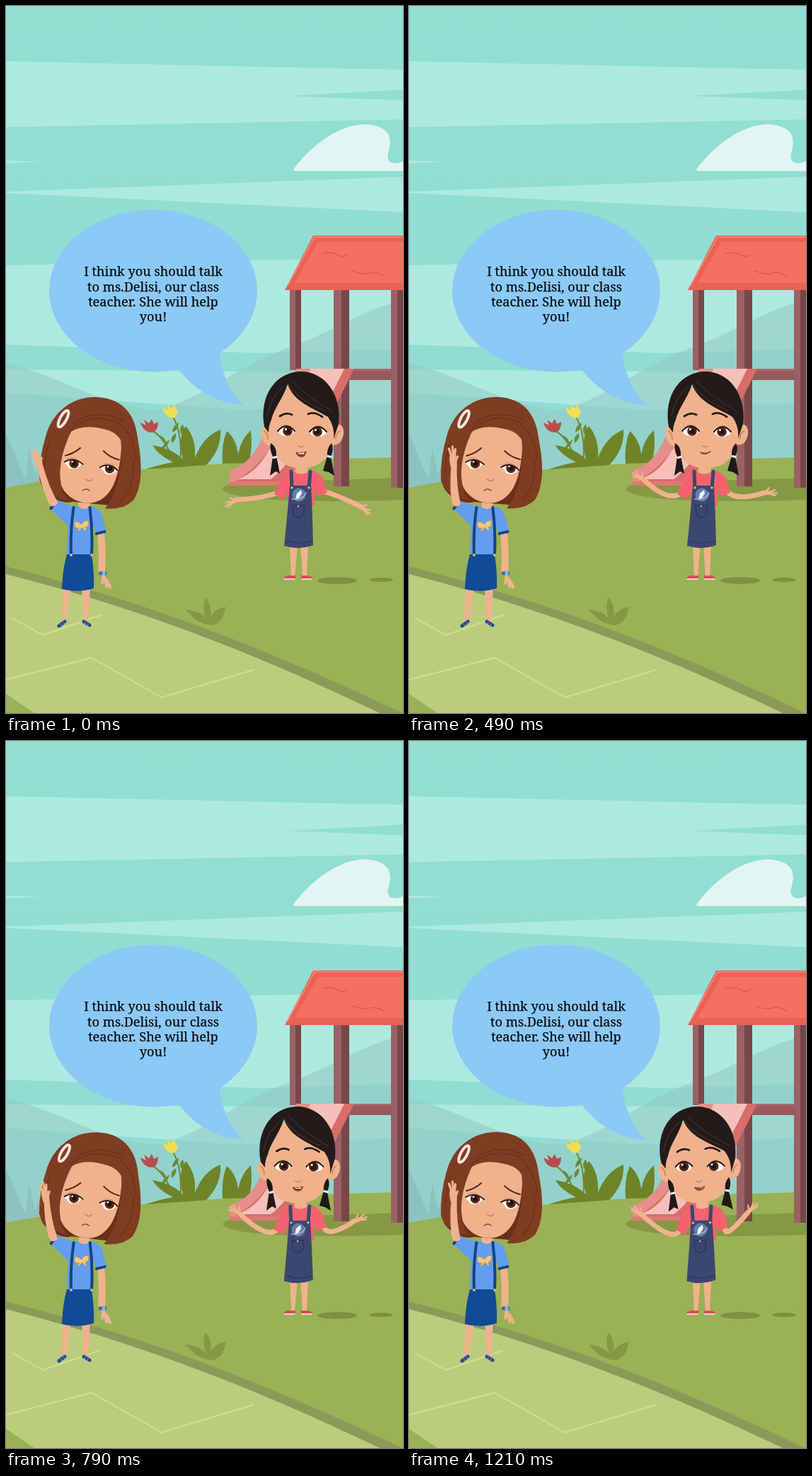
Animation of 561x998 px, one loop 1.28 s. Source, as an HTML page:

```html
<!DOCTYPE html>
<html lang="en">
<head>
<meta charset="utf-8">
<title>Playground talk</title>
<style>
html,body{margin:0;width:100%;height:100%;overflow:hidden;background:#93dfd2}
svg{position:fixed;inset:0;width:100%;height:100%;display:block}
.line{fill:none;stroke-linecap:round;stroke-linejoin:round}
.skin{fill:#f0b28d}
.limb{fill:none;stroke:#f0b28d;stroke-linecap:round;stroke-linejoin:round}
.fold{fill:none;stroke:#c8825f;stroke-width:1.5;stroke-linecap:round}
text{font:18.2px "Noto Serif",serif;text-anchor:middle;fill:#080c10;stroke:#080c10;stroke-width:.25}
</style>
</head>
<body>
<svg viewBox="0 0 561 998">
<defs>
  <linearGradient id="sky" x2="0" y2="1"><stop stop-color="#92dfd2"/><stop offset="1" stop-color="#90dcd4"/></linearGradient>
  <g id="hand">
    <ellipse class="skin" cx="5" rx="6" ry="3"/>
    <path class="limb" stroke-width="2.3" d="M7,0L18,0M7,-1L15,-4.5M7,1L16,3.5M2,-1L7,-7"/>
  </g>
</defs>

<g id="air">
  <path fill="url(#sky)" d="M0,0H561V700H0Z"/>
  <path fill="#aee9e0" d="M0,78L561,90V118L396,127L561,133V160L0,171ZM0,218L50,220L0,222ZM0,262L561,241V291L0,264ZM0,366L561,355V484L360,490L0,478ZM0,513L360,516L561,530V560L330,570L0,546Z"/>
  <path fill="#e3f5f3" d="M406,231C430,198 470,167 508,167C550,170 544,194 540,208C537,224 550,224 561,219V233H408Z"/>
  <path fill="#94cbc6" opacity=".6" d="M0,504C70,520 140,566 208,570C270,562 320,510 400,482C455,463 500,430 561,415V680H0Z"/>
  <path fill="#8cc3c2" d="M0,603L27,668L33,624L41,662L49,640L55,690H0Z"/>
</g>

<g id="ground">
  <path fill="#9ab155" d="M0,680C120,656 300,642 561,637V998H0Z"/>
  <path fill="#859944" d="M306,682C310,672 350,669 400,671L561,666V697C470,700 318,702 306,682Z"/>
  <path fill="#bacd7c" d="M0,797C190,848 350,908 545,998H0Z"/>
  <path fill="#8a9b59" d="M0,791C190,840 350,898 560,998H528C340,908 180,848 0,802Z"/>
  <path fill="#9ab155" d="M0,971L40,998H0Z"/>
  <path class="line" stroke="#d0df8b" stroke-width="2" d="M9,864L52,888L133,860M0,951L121,920L220,976L350,937"/>
  <path fill="#849846" d="M254,852Q276,854 283,866Q276,848 282,835Q292,847 289,862Q297,850 310,848Q309,869 292,874Q270,873 254,852Z"/>
  <g fill="#7e9140"><ellipse cx="468" cy="811" rx="28" ry="5"/><ellipse cx="530" cy="810" rx="17" ry="3"/></g>
</g>

<g id="plants">
  <path class="line" stroke="#6c8a37" stroke-width="2" d="M206,599Q226,610 237,645M236,580Q250,605 246,645"/>
  <path fill="#6c8a37" d="M218,606q1,9 9,14q0,-9 -9,-14M231,612q-7,4 -12,14q10,-3 12,-14M244,588q-9,5 -9,14q9,-4 9,-14M249,590q6,8 -1,15q-5,-8 2,-15M240,603q-8,4 -6,14q8,-6 6,-14"/>
  <path fill="#b84d50" d="M190,588l8,4l-3,-8l7,5l4,-6l3,7l6,-3q0,13 -8,15q-13,0 -17,-14z"/>
  <path fill="#f2df51" d="M221,567l8,3l-1,-8l6,6l4,-6l2,8l3,0q-1,11 -8,12q-10,-2 -14,-15z"/>
  <path fill="#6f8428" d="M197,654Q218,647 236,644Q215,634 207,620Q234,624 250,640Q242,610 254,593Q269,610 267,638Q278,608 303,598Q305,625 283,648Z"/>
  <path fill="#6f8428" d="M306,646Q304,618 312,600Q326,612 328,633Q332,611 346,599Q349,625 343,645Z"/>
</g>

<g id="tower">
  <path fill="#9a6264" d="M401,399h8v115h-8zM463,399h11v279h-11zM544,399h9v281h-9z"/>
  <path fill="#784748" d="M409,399h8v115h-8zM474,399h11v279h-11zM553,399h8v281h-8z"/>
  <path fill="#995a5e" d="M412,512H545V528H412Z"/><path fill="#a86a6c" d="M485,512h59v3h-59z"/>
  <path fill="#ea6157" d="M434,324H561V401H394Z"/>
  <path fill="#f4715f" d="M441,333H561V391H408Z"/>
  <path class="line" stroke="#f98b78" stroke-width="1.5" d="M561,326H436L398,395"/>
  <path class="line" stroke="#d9594e" stroke-width="1.3" d="M447,350Q460,346 468,351T482,351M489,374Q505,380 514,377T533,381"/>
  <path fill="#d96d6a" d="M410,512H492C465,566 442,616 412,645L397,677H316V655Q352,645 365,600Q389,575 410,512Z"/>
  <path fill="#f5c0ba" d="M430,512H478C452,565 425,615 393,650Q383,662 374,668H326Q354,660 372,626Q405,570 430,512Z"/>
  <path fill="#e58f8b" d="M410,512H430C407,575 378,638 326,669V677H316V655Q350,647 365,600Q390,580 410,512Z"/>
  <path fill="#e27873" d="M316,671H398V677H316Z"/>
</g>

<g id="bubble">
  <ellipse cx="208" cy="402" rx="147" ry="114.5" fill="#8cc9f5"/>
  <path fill="#8cc9f5" d="M243,512C266,543 300,562 336,563C314,545 305,516 301,488Z"/>
  <text x="208" y="381">I think you should talk</text>
  <text x="208" y="402.5">to ms.Delisi, our class</text>
  <text x="208" y="424">teacher. She will help</text>
  <text x="208" y="445">you!</text>
</g>

<g id="sadGirl">
  <path class="skin" d="M80,820H92L85,868L78,870ZM107,820H119L116,871L109,870Z"/>
  <path class="line" stroke="#234b8d" stroke-width="5" d="M75,875L83,869M110,869L118,874"/>
  <path class="line" stroke="#7fa6df" stroke-width="1" d="M77,872l2,3M81,869l2,3M112,870l-1,3M116,872l-1,3"/>
  <g id="sadBody">
    <path class="limb" stroke-width="10" d="M134,742Q137,770 135,798"/>
    <path class="limb" stroke-width="4" d="M136,798Q137,808 143,812L147,821M137,806L136,815M140,810L142,820"/>
    <path class="line" stroke="#386eae" stroke-width="5" d="M133,801h7"/><circle cx="138" cy="801" r="2.7" fill="#72c0de"/>
    <path class="skin" d="M103,692H119V709Q111,715 103,709Z"/>
    <path fill="#629df0" d="M102,706Q111,714 120,706Q133,709 136,718L142,742L127,746L124,732L122,778H86L88,733L82,728L64,710L74,697Q87,707 102,706Z"/>
    <path class="line" stroke="#17437f" stroke-width="4" d="M96,708Q91,740 92,774M119,708Q123,740 121,774"/>
    <path class="line" stroke="#17437f" stroke-width="4" stroke-dasharray="2 3" d="M128,745L141,742M64,709L73,698"/>
    <path fill="#f3c778" stroke="#c89345" stroke-width=".8" d="M107,732Q96,723 97,733Q98,738 104,737Q99,742 103,741L108,736L112,741Q115,739 112,736Q118,735 117,727Q111,725 107,732Z"/>
  </g>
  <path fill="#114a97" d="M86,774H121Q125,800 124,822Q102,829 79,823Q80,795 86,774Z"/>
  <circle cx="92" cy="775" r="2" fill="#e7b75d"/><circle cx="121" cy="775" r="2" fill="#e7b75d"/>
  <g id="sadHead">
    <path fill="#6b301b" d="M80,580C60,590 45,650 48,674C52,692 80,705 93,700L165,706C192,697 188,620 180,600Z"/>
    <path class="skin" d="M84,597C76,625 68,658 78,680C90,702 122,710 140,691C158,675 164,630 160,592L120,585Z"/>
    <path fill="#803c22" d="M54,608C63,573 92,551 126,552C165,553 181,580 184,610C190,640 193,675 179,697Q164,711 139,709C158,686 164,646 160,612Q153,601 140,598Q108,589 90,601C80,621 72,650 76,672Q77,690 87,698Q55,693 46,670Q45,638 54,608Z"/>
    <path class="line" stroke="#6a2f1a" stroke-width="1.2" d="M88,599Q115,573 156,587Q179,606 182,638M92,590Q125,566 164,585M60,611Q50,645 53,674M178,640Q181,678 161,698"/>
    <ellipse cx="78.5" cy="583" rx="4.5" ry="13" transform="rotate(28 78.5 583)" fill="none" stroke="#f5e4dc" stroke-width="4"/>
    <path fill="#fff8f4" d="M81,645Q92,633 106,646Q99,656 88,653ZM132,651Q145,640 156,655Q148,663 139,660Z"/>
    <g fill="#592a18"><circle cx="94.5" cy="646" r="6.8"/><circle cx="145" cy="652.5" r="6.8"/></g>
    <g fill="#241009"><circle cx="94.5" cy="646" r="3.4"/><circle cx="145" cy="652.5" r="3.4"/></g>
    <path fill="#d89a78" d="M80,643Q91,630 107,646Q94,636 80,643ZM131,650Q144,637 157,655Q144,643 131,650Z"/>
    <path class="line" stroke="#26130e" stroke-width="1.8" d="M81,644Q94,636 107,647M131,651Q145,643 156,655"/>
    <g fill="#fff"><circle cx="92" cy="643.5" r="1.3"/><circle cx="142.5" cy="650" r="1.3"/></g>
    <path class="line" stroke="#54291a" stroke-width="2" d="M82,635Q94,632 103,624M136,628Q145,637 158,640"/>
    <path class="fold" d="M111,668Q117,673 121,668"/>
    <path class="line" stroke="#8d493a" stroke-width="1.4" d="M107,684Q112,680 117,684"/>
  </g>
  <g id="wave">
    <path class="skin" d="M73,701Q66,712 59,700Q49,678 44,652L51,648Q60,680 73,701Z"/>
    <path class="skin" d="M44,655Q36,641 39,637Q47,634 50,644Q52,651 51,654Z"/>
    <path class="limb" stroke-width="3.2" d="M42,642L34,631M43,639L38,627M45,640L43,629M48,648L49,638"/>
  </g>
</g>

<g id="talkGirl">
  <path class="skin" d="M401,760H412L408,806H403ZM416,760H427L425,806H419Z"/>
  <path fill="#df4a5a" d="M392,808Q395,803 402,804H409V808ZM417,804H424Q432,804 433,808H417Z"/>
  <path class="line" stroke="#f7e9e6" stroke-width="1.5" d="M393,809H408M418,809H432"/>
  <g id="talkBody">
    <path class="limb" id="armL" stroke-width="7"/><path class="limb" id="armR" stroke-width="7"/>
    <use href="#hand" id="handL"/><use href="#hand" id="handR"/>
    <path class="skin" d="M409,645H426V660Q417,666 409,660Z"/>
    <path fill="#f3626e" d="M402,655Q417,666 431,655Q445,659 449,669L454,687L440,692L436,684V705H398V684L393,697L379,689L389,667Q393,658 402,655Z"/>
    <path fill="#3c476f" d="M401,677H431Q433,713 434,761Q414,769 393,762Q398,714 401,677Z"/>
    <path class="line" stroke="#3c476f" stroke-width="5" stroke-linecap="butt" d="M403,657L404,681M430,657L428,681"/>
    <circle cx="404" cy="680" r="1.7" fill="#e8b774"/><circle cx="428" cy="680" r="1.7" fill="#e8b774"/>
    <circle cx="414" cy="690" r="9.5" fill="#647da8"/>
    <path fill="#f4f4f4" d="M409,697L411,688L417,683L418,688L413,696Z"/>
    <path class="line" stroke="#aebdd4" stroke-width="1.3" d="M404,696Q421,697 424,687"/>
    <path class="line" stroke="#29335a" stroke-width="1.2" d="M405,705H421V717Q414,727 406,718ZM397,755Q414,761 433,755"/>
    <circle cx="413" cy="706" r="1.2" fill="#e8b774"/>
  </g>
  <g id="talkHead">
    <path class="skin" d="M374,592Q360,588 360,604Q364,623 377,621ZM463,592Q478,587 477,604Q474,622 460,619Z"/>
    <path class="fold" d="M365,600Q370,603 370,612M472,600Q466,602 466,611"/>
    <path class="skin" d="M374,557C366,595 370,633 394,647Q418,659 443,646C466,630 469,585 458,553L410,530Z"/>
    <path fill="#201918" d="M374,617Q383,622 382,635L387,660L381,657L373,663L377,636Q372,626 374,617ZM460,617Q464,626 459,636L464,663L456,658L448,656L454,635Q453,624 460,617Z"/>
    <path class="line" stroke="#f2eeee" stroke-width="3" d="M378,637.5L382,636.5M455,635.5L459,636.5"/>
    <path fill="#231b19" d="M365,594C357,548 383,516 417,516C450,516 475,548 470,590L463,611Q465,594 455,580C431,566 407,559 398,534C391,555 379,567 375,584Q371,592 371,602Z"/>
    <path class="line" stroke="#4b3731" stroke-width="1" d="M398,533Q413,557 449,571M405,530Q424,551 461,572M392,537Q373,554 369,579"/>
    <g id="face">
      <g id="whites" fill="#fffaf7"><ellipse cx="396" cy="600" rx="11" ry="7"/><ellipse cx="441" cy="601" rx="11.5" ry="7"/></g>
      <g id="iris"><g fill="#54271a"><circle cx="398" cy="600" r="6.8"/><circle cx="440" cy="601" r="6.8"/></g>
        <g fill="#21100c"><circle cx="398" cy="600" r="3.6"/><circle cx="440" cy="601" r="3.6"/></g>
        <g fill="#fff"><circle cx="395.5" cy="597.5" r="1.5"/><circle cx="437.5" cy="598.5" r="1.5"/></g></g>
      <path id="lids" fill="#d69b7b"/>
      <path id="lashes" class="line" stroke="#211513" stroke-width="2"/>
      <path class="line" stroke="#251a17" stroke-width="2.8" d="M387,579Q396,573 404,577M427,576Q436,572 447,580"/>
      <path class="fold" d="M413,621Q417,624 421,621"/>
      <path id="mouth" fill="#8f382f" stroke="#87402f" stroke-width="1.3" stroke-linejoin="round"/>
      <path id="teeth" fill="#fff"/>
    </g>
  </g>
</g>
</svg>
<script>
const LOOP = 1280, STEP = 30, LAST = 1200;
const $ = id => document.getElementById(id);
const set = (id, name, value) => $(id).setAttribute(name, value);
const move = (id, value) => set(id, 'transform', value);

// Smooth rise from 0 to 1 between a and b.
function ramp(t, a, b) {
  const u = Math.min(1, Math.max(0, (t - a) / (b - a)));
  return u * u * (3 - 2 * u);
}
// Smooth hump of height 1 around mid.
const bump = (t, mid, half) => 1 - ramp(Math.abs(t - mid), 0, half);
const cycle = (t, period) => Math.cos(2 * Math.PI * t / period);

function poseSad(t) {
  const sway = cycle(t - 330, 340);
  const start = Math.max(0, 1 - t / 300);
  const tilt = 4 + 4.3 * sway - 7.5 * start;
  const wave = 4.5 - 13.5 * sway * (1 - .7 * start);
  move('sadBody', `rotate(${tilt / 8 - .5} 103 778)`);
  move('sadHead', `translate(${sway}) rotate(${tilt} 113 702)`);
  move('wave', `translate(${sway / 2}) rotate(${wave} 66 704)`);
}

function arm(side, shoulder, elbow, wrist, turn) {
  set('arm' + side, 'd', `M${shoulder} Q${elbow} ${wrist}`);
  const flip = side === 'L' ? ' scale(1 -1)' : '';
  move('hand' + side, `translate(${wrist}) rotate(${turn})${flip}`);
}

function lidArc(x, y, shut) {
  const edge = y + shut * 2, low = y - 14 + shut * 26;
  const lash = `M${x - 12},${edge}Q${x},${low} ${x + 12},${edge}`;
  return { lash, lid: `${lash}Q${x},${y - 19} ${x - 12},${edge}Z` };
}

function poseArms(t) {
  const lift = ramp(t, 250, 520), late = ramp(t, 450, LAST);
  move('talkBody', `rotate(${-1.4 * late} 413 785)`);
  arm('L', [386, 687],
    [356 + 11 * (lift + late), 696 + 6 * lift + 9 * late],
    [326 + 6 * lift, 697 - 30 * lift],
    150 + 65 * lift);
  arm('R', [449, 685],
    [472 - 10 * lift - 17 * late, 692 + 8 * lift + 9 * late],
    [500 + 2 * lift - 20 * late, 706 - 20 * lift - 19 * late],
    37 - 37 * lift - 43 * late);
}

function poseFace(t) {
  const lean = bump(t, 660, 180), back = bump(t, 930, 270), turn = ramp(t, 690, 900);
  const tilt = 6 * lean - 2 * turn - 2 * back;
  const dx = 2 * ramp(t, 0, 150) - 4 * lean - 8.5 * turn - 6.5 * back;
  move('talkHead', `translate(${dx}) rotate(${tilt} 417 654)`);
  move('face', `translate(${turn + 3 * back - 4 * lean})`);
  move('iris', `translate(${-2 * turn})`);

  const shut = Math.min(1, 2 * bump(t, 150, 120));
  const eyes = [lidArc(396, 600, shut), lidArc(441, 601, shut)];
  set('lids', 'd', eyes.map(e => e.lid).join(''));
  set('lashes', 'd', eyes.map(e => e.lash).join(''));
  for (const id of ['whites', 'iris']) set(id, 'opacity', shut > .9 ? 0 : 1);

  const open = .55 + .45 * cycle(t, 950), low = 632 + 4 * open;
  set('mouth', 'd', `M410,630Q417,632 424,629Q422,${630 + 7 * open} 417,${low}Q412,${low} 410,630Z`);
  set('teeth', 'd', `M412,630.5Q417,632 422,630L421,${630.5 + 2 * open}H414Z`);
}

function draw(time) {
  const t = Math.min(LAST, Math.floor(time % LOOP / STEP) * STEP);
  poseSad(t);
  poseArms(t);
  poseFace(t);
}

const begin = performance.now();
function tick() {
  draw(performance.now() - begin);
  requestAnimationFrame(tick);
}
tick();
</script>
</body>
</html>
```
